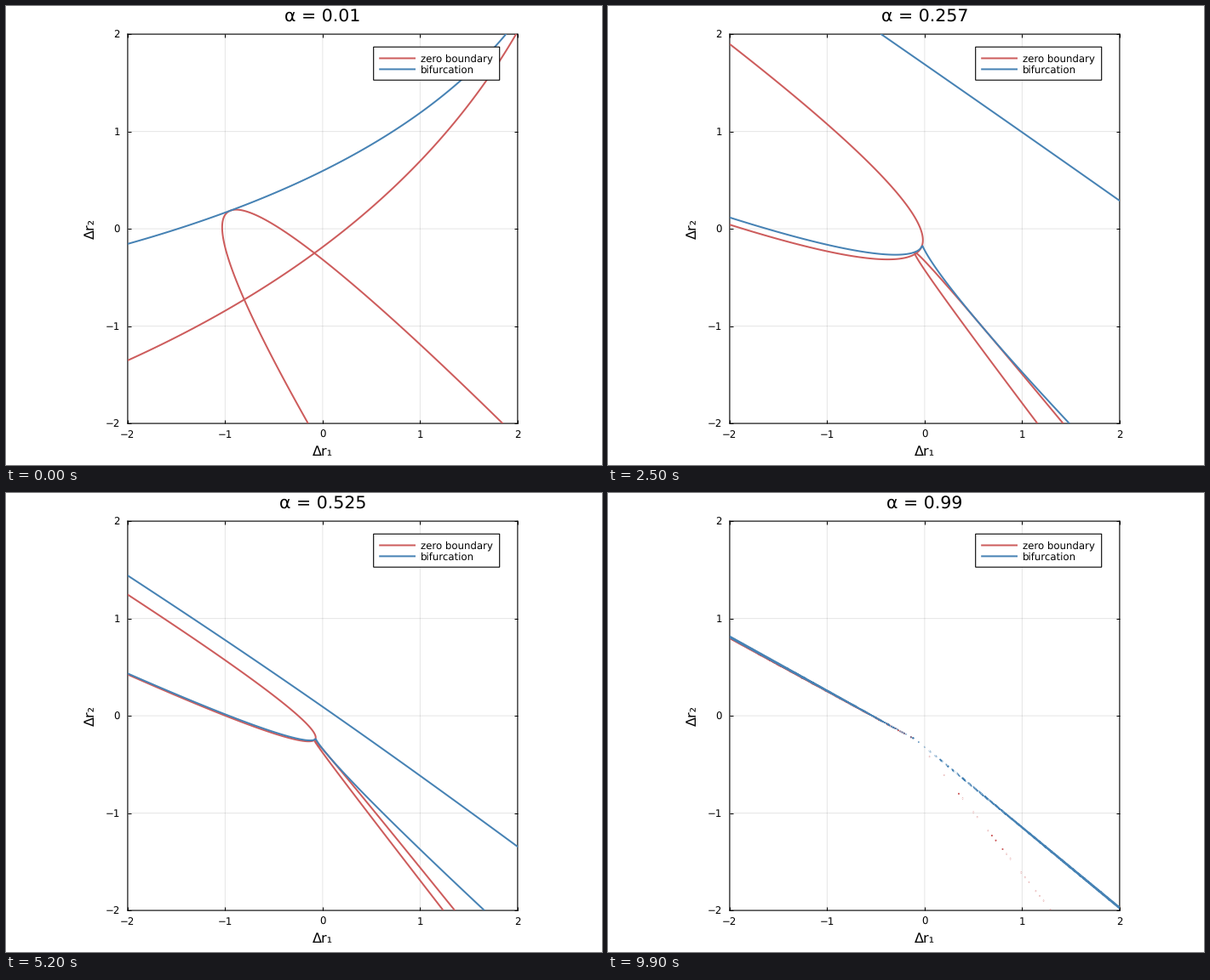
A matplotlib script that plays this animation: 700 px wide and 540 px high, repeating every 10 s.

```python
import numpy as np
import matplotlib.pyplot as plt
from matplotlib.animation import FuncAnimation
from matplotlib.patches import Rectangle

# Two species with pairwise (weight 1 - alpha) and higher-order (weight alpha)
# interactions; equilibria solve
#   r0 + dr = (1 - alpha)(a1 x + a2 y) + alpha (b1 x^2 + c x y + b2 y^2)
R0 = np.array([0.0845, 0.25])
A1, A2 = np.array([0.352, 0.2574]), np.array([0.1747, -0.135])
B1, B2 = np.array([-1, 0.5485]), np.array([0.7903, -1])
C = np.array([-1.8738, 0.9286])

W, H, DPI = 700, 540, 100
PT = 72 / DPI
LEFT, RIGHT, TOP, BOTTOM = 142.9, 600.9, 33.1, 491.1
RED, BLUE = "#cd5c5c", "#4682b4"
FRAMES = 100

grid = np.linspace(-2, 2, 401)
DX, DY = np.meshgrid(grid, grid)
R1, R2 = DX + R0[0], DY + R0[1]


def boundary(a, b):
    """Resultant of both equations when only one species is present."""
    cross = a[0] * b[1] - a[1] * b[0]
    return (R1 * b[1] - R2 * b[0]) ** 2 + cross * (R1 * a[1] - R2 * a[0])


def fold(a1, a2, b1, b2, c):
    """Discriminant of det(Q1 + t Q2): zero where the two conics touch."""
    mul = np.convolve
    s, u, v = c / 2, a1 / 2, a2 / 2
    q = mul(b1, b2) - mul(s, s)
    p = 2 * mul(s, mul(u, v)) - mul(b1, mul(v, v)) - mul(b2, mul(u, u))
    k0 = p[0] - R1 * q[0]
    k1 = p[1] - R1 * q[1] - R2 * q[0]
    k2 = p[2] - R1 * q[2] - R2 * q[1]
    k3 = p[3] - R2 * q[2]
    return (18 * k0 * k1 * k2 * k3 - 4 * k2**3 * k0 + (k1 * k2) ** 2
            - 4 * k3 * k1**3 - 27 * (k0 * k3) ** 2)


plt.rcParams.update({"font.family": "DejaVu Sans",
                     "text.hinting": "no_hinting",
                     "path.simplify": False})
fig = plt.figure(figsize=(W / DPI, H / DPI), dpi=DPI, facecolor="white")
ax = fig.add_axes([LEFT / W, 1 - BOTTOM / H,
                   (RIGHT - LEFT) / W, (BOTTOM - TOP) / H])
ax.set(xlim=(-2, 2), ylim=(-2, 2), xticks=range(-2, 3), yticks=range(-2, 3))
ax.set_autoscale_on(False)
ax.set_axisbelow(True)
ax.grid(color="black", alpha=0.1, lw=PT, snap=False)
ax.tick_params(direction="in", top=True, right=True, length=4 * PT,
               width=PT, labelbottom=False, labelleft=False)
for spine in ax.spines.values():
    spine.set(linewidth=1.1 * PT, snap=False)

# Overlay in pixel units for text and legend
over = fig.add_axes([0, 0, 1, 1])
over.set(xlim=(0, W), ylim=(H, 0))
over.axis("off")


def label(x, y, s, size, ha="center", **kw):
    return over.text(x, y, s, fontsize=size * PT, ha=ha, va="baseline", **kw)


MID_X, MID_Y = (LEFT + RIGHT) / 2, (TOP + BOTTOM) / 2
title = label(MID_X, 18.5, "", 20.5)
label(MID_X, 529, "Δr₁", 16.1)
label(103.7, MID_Y - 0.5, "Δr₂", 16.1, rotation=90, rotation_mode="anchor")
for v in range(-2, 3):
    text = str(v).replace("-", "−")
    shift = v * (RIGHT - LEFT) / 4
    label(MID_X + shift, 508, text, 11.7)
    label(134, MID_Y - shift + 4.3, text, 11.7, ha="right")

over.add_patch(Rectangle((431.7, 48.2), 148, 39, fc="white", ec="black",
                         lw=1.1 * PT, snap=False))
for y, color, name in ((61.5, RED, "zero boundary"), (74.4, BLUE, "bifurcation")):
    over.plot([438.2, 481], [y, y], color=color, lw=2 * PT,
              solid_capstyle="butt", snap=False)
    label(487.3, y + 4.3, name, 11.75, ha="left")

curves = []


def draw(i):
    while curves:
        curves.pop().remove()
    alpha = 0.01 + 0.98 * i / (FRAMES - 1)
    a1, a2 = (1 - alpha) * A1, (1 - alpha) * A2
    b1, b2, c = alpha * B1, alpha * B2, alpha * C
    for z, color in ((boundary(a1, b1), RED), (boundary(a2, b2), RED),
                     (fold(a1, a2, b1, b2, c), BLUE)):
        curve = ax.contour(grid, grid, z, levels=[0], colors=color,
                           linewidths=2 * PT, zorder=3)
        curve.set(capstyle="round", joinstyle="round", snap=False)
        curves.append(curve)
    title.set_text(f"α = {round(alpha, 3)}")
    return curves


anim = FuncAnimation(fig, draw, frames=FRAMES, interval=100, repeat=True,
                     repeat_delay=0, init_func=lambda: [])
plt.show()
```
